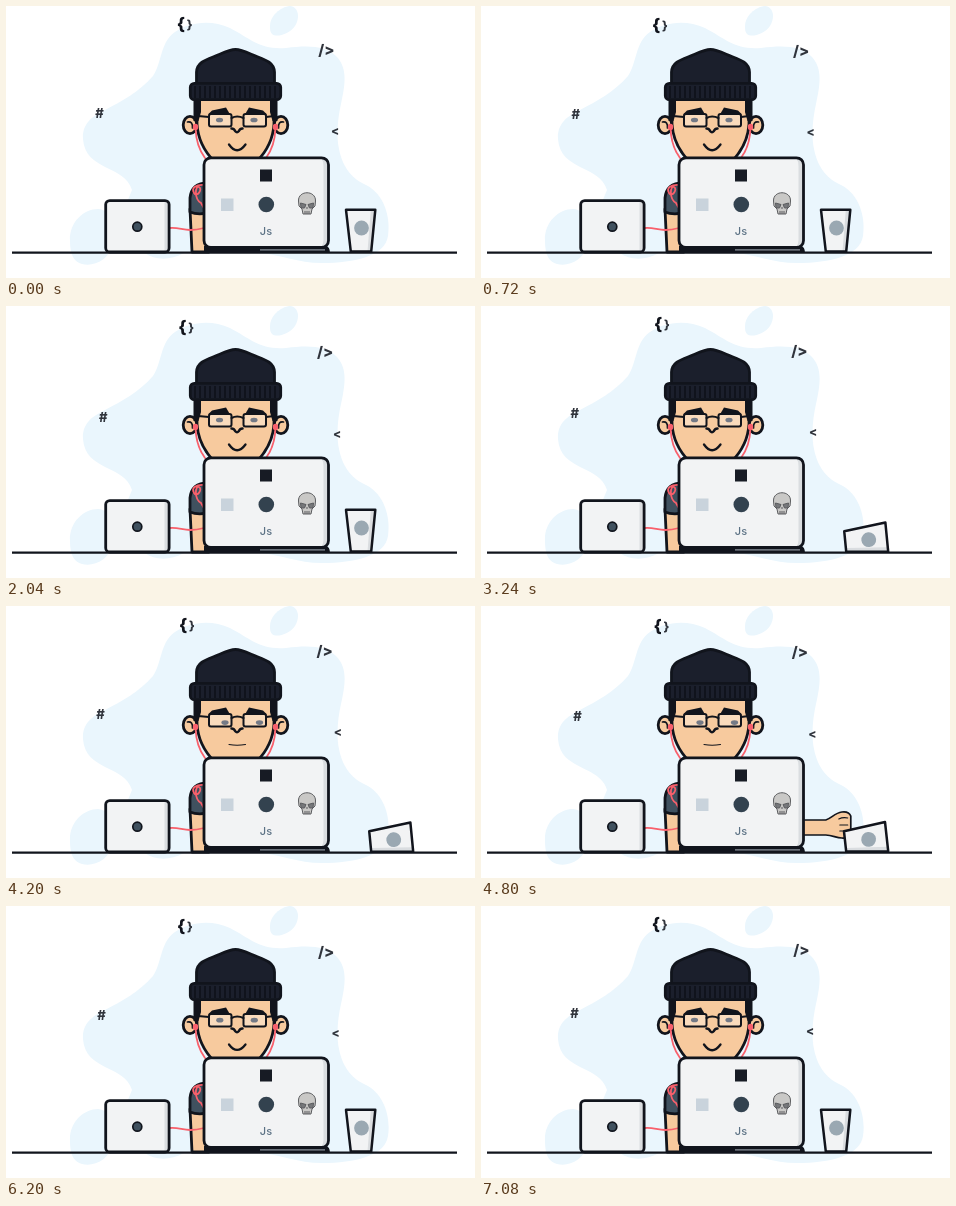
An HTML page that plays this animation: 469x272 px, repeating every 7120 ms.

```html
<!DOCTYPE html>
<html lang="en">
<head>
<meta charset="utf-8">
<title>Developer at a desk</title>
<style>
  html, body { margin: 0; width: 100%; height: 100%; overflow: hidden; background: #fff; }
  svg { display: block; width: 469px; height: 272px; }
  text { font-family: Inter, sans-serif; font-weight: 800; text-anchor: middle; fill: #30343c; }
  .ink { stroke: #11141c; stroke-width: 2.8; stroke-linejoin: round; stroke-linecap: round; }
  .thin { stroke-width: 1.7; }
  .line { fill: none; }
  .skin { fill: #f7ca9e; }
  .shell { fill: #f2f3f4; }
  .shade { fill: #dadde0; }
  .slate { fill: #40515f; }
  .cord { fill: none; stroke: #f8606c; stroke-width: 1.8; stroke-linecap: round; }
</style>
</head>
<body>
<svg viewBox="0 0 469 272">
  <g fill="#eaf6fd">
    <path d="M77 133C76 117 87 110 99 104C116 95 133 86 147 70C156 57 154 36 169 26C183 16 205 13 224 22C245 33 254 44 280 42C304 39 320 40 331 51C342 63 339 80 335 98C332 111 330 129 333 143C337 163 347 173 360 179C378 188 385 211 382 230C379 250 349 257 316 257C291 257 276 249 255 247H178C164 255 148 254 139 247H100L126 184C119 159 79 165 77 133Z"/>
    <path d="M64 235C63 216 78 203 92 203C106 204 112 221 107 238C103 254 88 261 76 258C68 256 64 249 64 235Z"/>
    <path d="M264 20C264 10 274 1 284 0C293 1 294 12 289 20C284 28 270 32 266 28C264 26 264 23 264 20Z"/>
  </g>

  <g id="braces"><text x="-4.8" y="5" font-size="17" style="fill:#11141c">{</text><text x="4" y="4" font-size="12">}</text></g>
  <g id="hash"><text y="4.8" font-size="13">#</text></g>
  <g id="slash"><text y="5.2" font-size="15">/&gt;</text></g>
  <g id="less"><text y="4.6" font-size="12">&lt;</text></g>

  <!-- arm -->
  <path class="ink skin" d="M184 203L186 246H203V203Z"/>
  <path class="ink slate" d="M202 177C191 177 185 182 184 192V206Q191 209 202 207Z"/>
  <path class="cord" d="M199 179C190 178 185 182 188 187S197 183 193 181S188 193 195 197L199 204"/>

  <!-- head -->
  <g id="ear">
    <ellipse class="ink skin" cx="184" cy="119" rx="6.8" ry="8.7"/>
    <path class="ink line thin" d="M181.5 116Q187 115 186.5 122"/>
  </g>
  <use href="#ear" transform="matrix(-1 0 0 1 459 0)"/>
  <path class="ink skin" d="M191 92V118C192 134 198 145 208 155H251C261 145 267 134 268 118V92Z"/>
  <g id="side">
    <path fill="#11141c" d="M187.5 93H195V106L192.5 115H187.5Z"/>
    <path class="cord" d="M189.5 122C190 136 193 144 199 152"/>
    <ellipse cx="189.5" cy="121" rx="2.7" ry="3.3" fill="#f8606c"/>
  </g>
  <use href="#side" transform="matrix(-1 0 0 1 459 0)"/>

  <g fill="#fff" fill-opacity=".32">
    <rect x="203" y="108" width="22.5" height="12.5" rx="2"/>
    <rect x="237.5" y="108" width="22.5" height="12.5" rx="2"/>
  </g>
  <g id="eyes" fill="#747a86">
    <ellipse cx="213.5" cy="114" rx="3.6" ry="2.3"/>
    <ellipse cx="248" cy="114" rx="3.6" ry="2.3"/>
  </g>
  <path id="brow" fill="#11141c" d="M202 108.5L206 104.5L220 101.5L223.5 107.5L211 109Z"/>
  <use href="#brow" transform="matrix(-1 0 0 1 463 0)"/>
  <g class="ink line" style="stroke-width:2">
    <rect x="203" y="108" width="22.5" height="12.5" rx="2"/>
    <rect x="237.5" y="108" width="22.5" height="12.5" rx="2"/>
    <path d="M225.5 112Q231 109 237.5 112M203 111L192 110M260 111L268 110"/>
    <path stroke-width="2.5" d="M225.5 122.5Q228 122.5 229.3 125.2Q231 127.2 232.7 125.2Q234 122.5 236.5 122.5"/>
    <path id="mouth"/>
  </g>

  <path class="ink" fill="#1b1f2c" d="M190.5 80V66C191 57 199 54 207 51C217 47 223 43.5 229.5 43.5C236 43.5 242 47 252 51C260 54 268 57 268.5 66V80Z"/>
  <rect class="ink" fill="#1b1f2c" x="184.3" y="77.3" width="90.4" height="16.4" rx="4"/>
  <path id="ribs" fill="none" stroke="#0c0e15" stroke-width="1.3"/>

  <!-- hand and cup -->
  <g id="hand">
    <path class="ink skin thin" d="M282 214H321C327 212 330 207 337 206Q344 205 346 210V229Q343 233 337 232C331 232 328 229 321 229H282Z"/>
    <path class="ink line" style="stroke-width:1.1" d="M334 213Q338 211 343 212M335 219H343M335 225H343"/>
  </g>
  <g id="cup">
    <path class="shell" d="M340 203.8H369.3L365.2 245.6H344.8Z"/>
    <path class="shade" d="M364.8 203.8H369.3L365.2 245.6H361.5Z"/>
    <circle cx="355.5" cy="222" r="7.4" fill="#9aa8b2"/>
    <path class="ink line" style="stroke-width:2.5" d="M340 203.8H369.3L365.2 245.6H344.8Z"/>
  </g>

  <path class="cord" d="M164 222C176 221 179 227 198 222"/>

  <!-- large laptop -->
  <path fill="#11141c" d="M198 240H320Q324 241 324 247H198Z"/>
  <path stroke="#8b929b" stroke-width="1.2" d="M254 243.8H319"/>
  <rect class="shell" x="198" y="151.8" width="124.5" height="89.7" rx="7"/>
  <path class="shade" d="M315 152Q322.5 152 322.5 160V234Q322.5 241.5 315 241.5Q317.5 238 317.5 234V160Q317.5 155 315 152Z"/>
  <rect class="ink line" x="198" y="151.8" width="124.5" height="89.7" rx="7"/>
  <rect x="254" y="163.5" width="12" height="12" fill="#171b24"/>
  <rect x="215" y="192.5" width="12.5" height="12.5" fill="#c9d3dc"/>
  <circle cx="260.3" cy="198.5" r="7.8" fill="#33424f"/>
  <text x="260" y="229" font-size="11" style="font-weight:500;fill:#5b7184">Js</text>
  <g stroke="#5c5d60" stroke-width="1" fill="#c9c8c6">
    <path d="M292.5 195C292 184 310 184 309.5 195L309 200L306 203L305 208H297L296 203L293 200Z"/>
    <path d="M294.5 197L300 198.5L298.5 202H295ZM307.5 197L302 198.5L303.5 202H307Z" fill="#77787b"/>
    <path d="M301 201V203M299 205V208M301 205V208M303 205V208"/>
  </g>

  <!-- small laptop -->
  <rect class="shell" x="99.7" y="194.6" width="63.4" height="51.4" rx="4"/>
  <path class="shade" d="M158.5 195H160Q163 195 163 198V246H158.5Z"/>
  <rect class="ink line" x="99.7" y="194.6" width="63.4" height="51.4" rx="4"/>
  <circle class="ink slate thin" cx="131.3" cy="220.7" r="4.5"/>

  <path stroke="#11141c" stroke-width="2.4" d="M6 246.6H451"/>
</svg>
<script>
const LOOP = 7120;
const $ = id => document.getElementById(id);
const move = (id, x, y) => $(id).setAttribute("transform", `translate(${x} ${y})`);

// Each symbol sways around its centre.
const symbols = [
  { id: "braces", x: 180.8, y: 20.6, dx: -1.2, dy: 1.5, turns: 1 },
  { id: "hash", x: 95.4, y: 109, dx: -2, dy: 2.2, turns: 2 },
  { id: "slash", x: 319.4, y: 45.2, dx: 1, dy: 1, turns: 1 },
  { id: "less", x: 330.7, y: 126.3, dx: -1.5, dy: 1.5, turns: 1 }
];

// Smooth rise from 0 to 1 between two times.
function step(t, from, to) {
  const u = Math.min(1, Math.max(0, (t - from) / (to - from)));
  return u * u * (3 - 2 * u);
}

// Accelerating fall with one small rebound.
function fall(t) {
  const u = Math.max(0, (t - 2480) / 300);
  if (u < 1) return u * u;
  return u < 1.6 ? 1 - .08 * Math.sin(Math.PI * (u - 1) / .6) : 1;
}

let ribs = "";
for (let x = 189; x < 273; x += 5) ribs += `M${x} 80V92`;
$("ribs").setAttribute("d", ribs);

function draw(t) {
  const angle = 2 * Math.PI * t / LOOP;
  for (const s of symbols)
    move(s.id, s.x + s.dx * Math.cos(s.turns * angle), s.y - s.dy * Math.cos(2 * angle - .15));

  const worry = step(t, 3480, 3760) - step(t, 5960, 6240);
  move("eyes", 5.5 * worry, 2.6 * worry);
  $("mouth").setAttribute("d", `M223 138.5Q231 ${150 - 10 * worry} 239.5 138.5`);
  $("mouth").style.strokeWidth = 2.3 - 1.2 * worry;

  const lift = step(t, 4780, 5160);
  $("cup").setAttribute("transform", `rotate(${84.5 * (fall(t) - lift)} 365.2 245.6)`);
  move("hand", 54 * step(t, 4340, 4680) - 24 * lift - 30 * step(t, 5480, 5840) - 30, 0);
}

const start = performance.now();
function tick() {
  draw((performance.now() - start) % LOOP);
  requestAnimationFrame(tick);
}
tick();
</script>
</body>
</html>
```
